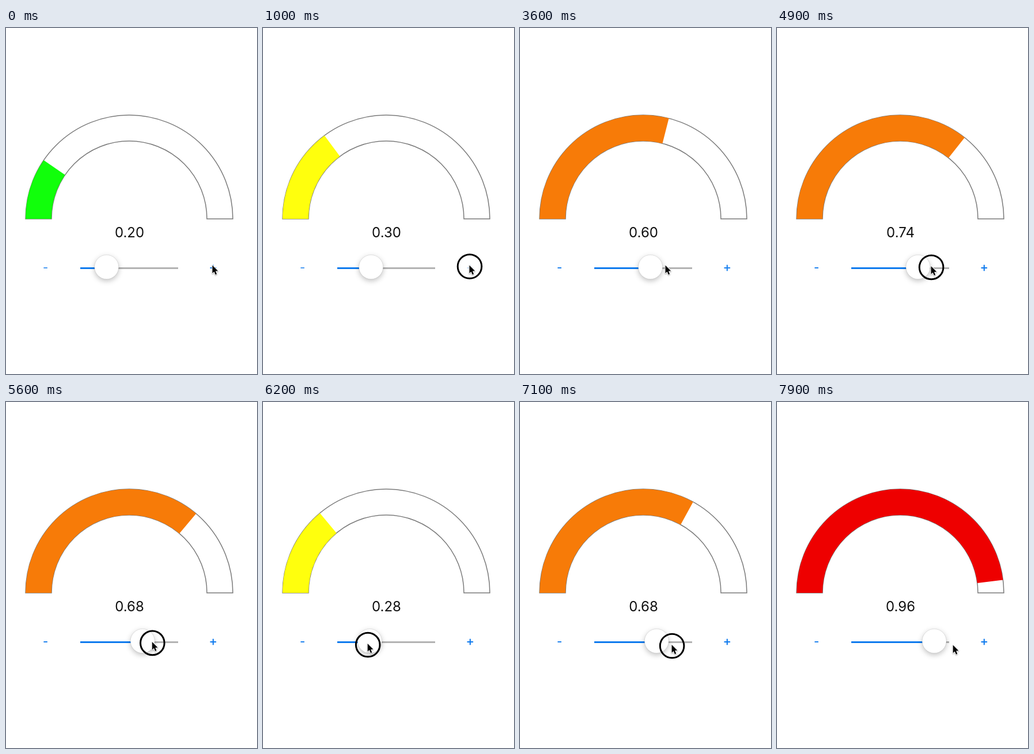
These frames come from a looping animation (436x600 px, 8 s). An HTML page with a canvas:

```html
<!DOCTYPE html>
<html>
<head>
<meta charset="utf-8">
<style>
html, body { margin: 0; width: 100%; height: 100%; overflow: hidden; background: #fff; }
canvas { display: block; }
</style>
</head>
<body>
<canvas id="stage" width="436" height="600"></canvas>
<script>
const ctx = document.getElementById('stage').getContext('2d');
const LOOP = 8000, STEP = 100;
const FONT = 'Inter, Roboto, sans-serif';
const CX = 214, CY = 331, OUTER = 180, INNER = 135;
const BLUE = '#107bee';

// Five taps on "+", evenly spaced, each raise the value by 0.1
const FIRST = -775, GAP = 925, TAPS = 5, FADE = 950, PRESS = 140;
// Then the slider is dragged up, down and up again
const DRAG = 4600, DROP = 7900, LAG = 40;
const swings = [[DRAG, .6], [5240, .915], [6120, .278], [7860, .96]];
// Turning points of the pointer tip: time, x, y
const turns = [
  [3100, 358.5, 411.5], [3600, 252.5, 411.5], [DRAG, 240, 412],
  [5220, 298, 414], [6130, 181, 419], [7720, 305.7, 421.5]
];

const clamp = x => Math.max(0, Math.min(1, x));
const ease = x => x * x * (3 - 2 * x);

// Eased value of column i between turning points
function glide(keys, t, i) {
  let v = keys[0][i];
  for (let n = 1; n < keys.length; n++) {
    const [a, b] = [keys[n - 1], keys[n]];
    v += (b[i] - a[i]) * ease(clamp((t - a[0]) / (b[0] - a[0])));
  }
  return v;
}

const tapCount = t => Math.min(TAPS, Math.floor((t - FIRST) / GAP) + 1);

function valueAt(t) {
  return t < DRAG ? .1 + .1 * tapCount(t) : glide(swings, t, 1);
}

function gaugeAt(t) {
  if (t >= DRAG) return glide(swings, t - LAG, 1);
  const n = tapCount(t);
  const since = t - FIRST - (n - 1) * GAP;
  return .1 * n + .1 * ease(clamp(since / FADE));
}

function colorOf(v) {
  if (v < .25) return '#11ff0b';
  if (v <= .505) return '#ffff0d';
  return v <= .75 ? '#f77b08' : '#ee0000';
}

function arch(part) {
  const end = Math.PI * (1 + part);
  ctx.beginPath();
  ctx.arc(CX, CY, OUTER, Math.PI, end);
  ctx.arc(CX, CY, INNER, end, Math.PI, true);
  ctx.closePath();
}

function gauge(part, color) {
  arch(1);
  ctx.strokeStyle = '#7a7a7a';
  ctx.lineWidth = 1.5;
  ctx.stroke();
  arch(part);
  ctx.fillStyle = color;
  ctx.fill();
}

function slider(v) {
  const x = 148.8 + 129.5 * v;
  ctx.fillStyle = '#b3b3b3';
  ctx.fillRect(129, 415, 170, 3);
  ctx.fillStyle = BLUE;
  ctx.fillRect(129, 415, x - 129, 3);
  ctx.beginPath();
  ctx.arc(x, 414.5, 21, 0, 2 * Math.PI);
  ctx.save();
  ctx.shadowColor = 'rgba(0,0,0,.25)';
  ctx.shadowBlur = 10;
  ctx.shadowOffsetY = 3;
  ctx.fillStyle = '#fff';
  ctx.fill();
  ctx.restore();
  ctx.strokeStyle = 'rgba(0,0,0,.12)';
  ctx.lineWidth = .8;
  ctx.stroke();
}

// Text centred on its visible ink
function sign(s, x, y, size, alpha) {
  ctx.save();
  ctx.globalAlpha = alpha;
  ctx.font = '500 ' + size + 'px ' + FONT;
  ctx.fillStyle = BLUE;
  ctx.textAlign = 'left';
  const m = ctx.measureText(s);
  ctx.fillText(s,
    x - (m.actualBoundingBoxRight - m.actualBoundingBoxLeft) / 2,
    y + (m.actualBoundingBoxAscent - m.actualBoundingBoxDescent) / 2);
  ctx.restore();
}

function pointer(x, y, down) {
  if (down) {
    ctx.beginPath();
    ctx.arc(x + .5, y + 2, 20.8, 0, 2 * Math.PI);
    ctx.strokeStyle = '#000';
    ctx.lineWidth = 3;
    ctx.stroke();
  }
  ctx.save();
  ctx.translate(x, y);
  ctx.scale(.95, .95);
  ctx.beginPath();
  [[0, 0], [0, 14.5], [3.3, 11.5], [5.6, 17], [8, 16], [5.8, 10.6], [10.2, 10.3]]
    .forEach(p => ctx.lineTo(...p));
  ctx.closePath();
  ctx.lineJoin = 'round';
  ctx.lineWidth = 2;
  ctx.strokeStyle = '#fff';
  ctx.shadowColor = 'rgba(0,0,0,.35)';
  ctx.shadowBlur = 2;
  ctx.shadowOffsetY = 1;
  ctx.stroke();
  ctx.shadowColor = 'transparent';
  ctx.fillStyle = '#000';
  ctx.fill();
  ctx.restore();
}

function draw(t) {
  const value = valueAt(t);
  const since = t - FIRST - (tapCount(t) - 1) * GAP;
  const tapping = tapCount(t) < TAPS && since >= GAP - PRESS;
  const dragging = t >= DRAG && t < DROP;
  const dip = 9 * Math.exp(-(((t - 6700) / 220) ** 2));

  ctx.fillStyle = '#fff';
  ctx.fillRect(0, 0, 436, 600);
  gauge(gaugeAt(t), colorOf(value));

  ctx.font = '24px ' + FONT;
  ctx.textAlign = 'center';
  ctx.fillStyle = '#111';
  ctx.fillText(value.toFixed(2), CX + .5, 363);

  slider(value);
  sign('-', 68.5, 416, 20, tapCount(t) < TAPS ? .8 : 1);
  sign('+', 360, 416, 22, tapping ? .2 : clamp(.2 + since / 900));
  pointer(glide(turns, t, 1), glide(turns, t, 2) + dip, dragging || tapping);
}

const start = performance.now();
function loop() {
  const t = (performance.now() - start) % LOOP;
  draw(Math.floor(t / STEP) * STEP);
  requestAnimationFrame(loop);
}
draw(0);
requestAnimationFrame(loop);
</script>
</body>
</html>
```
